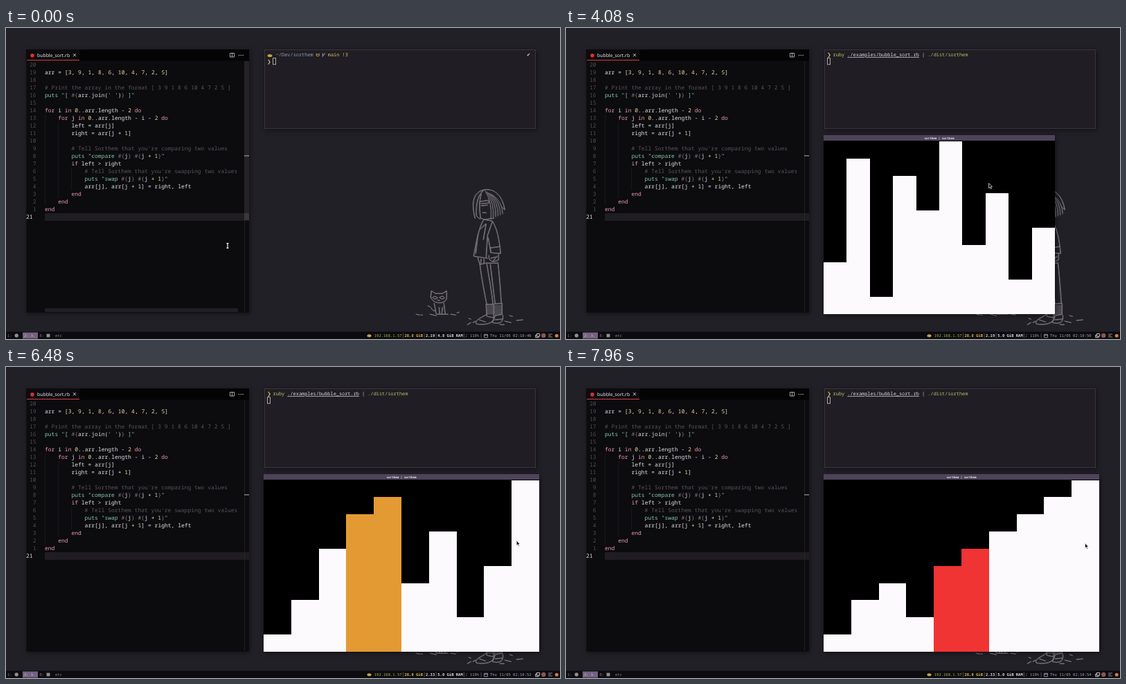
These frames come from a looping animation (800 px wide and 450 px high, 8000 ms). An HTML page:

```html
<!DOCTYPE html>
<html lang="en">
<head>
<meta charset="utf-8">
<title>Bubble sort on a desktop</title>
<style>
  html, body { margin: 0; width: 100%; height: 100%; overflow: hidden; background: #222027; }
  svg { display: block; width: 800px; height: 450px; }
  text { white-space: pre; text-rendering: geometricPrecision; font-family: "Noto Sans Mono", monospace; }
  .code { font-size: 8px; fill: #e2e0e4; }
  .term { font-size: 6.92px; fill: #d6d4d8; }
  .bar { font: 5.5px "DejaVu Sans Mono", monospace; }
  .bold { font-weight: bold; }
  .shadow { filter: drop-shadow(1.5px 2px 3px rgba(0, 0, 0, .5)); }
  .sketch { fill: none; stroke: #78767b; stroke-linecap: round; stroke-linejoin: round; }
</style>
</head>
<body>
<svg id="stage" viewBox="0 0 800 450"></svg>
<script>
const LOOP = 8000;
const stage = document.getElementById('stage');

function set(node, attrs) {
  for (const key in attrs) node.setAttribute(key, attrs[key]);
  return node;
}
function el(tag, attrs, parent = stage, text) {
  const node = set(document.createElementNS('http://www.w3.org/2000/svg', tag), attrs);
  if (text !== undefined) node.textContent = text;
  parent.appendChild(node);
  return node;
}
const box = (x, y, width, height, fill, parent, more) => el('rect', { x, y, width, height, fill, ...more }, parent);
const label = (x, y, cls, fill, text, parent) => el('text', { x, y, class: cls, fill, style: `fill:${fill}` }, parent, text);
const path = (d, stroke, width, parent) => el('path', { d, stroke, 'stroke-width': width, fill: 'none' }, parent);
const show = (node, on) => set(node, { opacity: +on });
const clamp = (v, lo, hi) => Math.min(hi, Math.max(lo, v));

// Wallpaper
box(0, 0, 800, 450, '#222027');
function drawSketch() {
  const g = el('g', { class: 'sketch', id: 'sketch' });
  const strokes = [
    // head
    'M677 275C671 252 675 237 690 234C706 231 717 244 720 263L715 258',
    'M690 234C681 241 678 254 679 272L684 276M686 240C683 250 683 262 685 275',
    'M684 251L697 249L697 253L686 254M686 257L695 256M688 267L693 267M685 275L691 277L704 275',
    // jacket and hand
    'M690 277C684 284 680 303 675 330L695 333M690 277L702 279C709 290 712 306 714 326L700 325L696 303',
    'M699 318L713 316M702 280L695 300L693 332M684 291L693 283L689 306M681 300L678 326M700 325L699 318',
    'M697 329C696 338 704 340 711 335L711 327M700 333L707 331M703 337L709 330',
    // legs
    'M681 332L684 342L692 340L709 340M686 334L685 341M690 334L690 340',
    'M684 342C687 365 691 385 694 400M694 341C697 360 701 380 703 400M699 341L706 399M710 339C713 365 714 385 715 399',
    // socks and shoes
    'M693 400L694 417L704 419L704 400ZM705 399L716 398L716 414L706 416',
    'M694 414C684 420 676 423 679 428C690 430 704 428 705 419M683 422L692 425M706 416L702 426C712 429 719 426 717 415M706 422L716 421',
    // cat
    'M613 389L614 380L620 384L630 384L636 380L636 391C634 400 616 400 613 389',
    'M616 390Q619 386 623 390Q619 394 616 390M626 390Q630 386 633 390Q630 394 626 390M623 394L626 394',
    'M618 398L621 414L634 414L632 398M625 404L626 414M630 404L629 414M620 409C612 410 617 403 609 402',
    // ground
    'M592 414l5 1M599 415l2 0M612 414l9 2M635 414l3 0M651 412l3 -1M642 414l7 1M666 429l5 -3M674 426l4 -2M720 424l9 2M737 423l9 -1M727 416l4 1M668 420l3 1M713 429l6 0'
  ];
  strokes.forEach(d => el('path', { d }, g));
  let hatch = '', hair = '';
  for (let x = 695; x < 716; x += 2) hatch += `M${x} 401l.6 13`;
  for (let i = 0; i < 6; i++) hair += `M${692 + i * 2} ${236 + i}Q${702 + i * 3} 252 ${700 + i * 3.4} ${276 - i * 1.5}`;
  el('path', { d: hatch, 'stroke-width': .6 }, g);
  el('path', { d: hair, 'stroke-width': .8 }, g);
  // A second, offset pass gives the doubled pencil line.
  el('use', { href: '#sketch', transform: 'translate(.7 .5)', opacity: .8 });
}
drawSketch();

// Editor
const CODE = `
arr = [3, 9, 1, 8, 6, 10, 4, 7, 2, 5]

# Print the array in the format [ 3 9 1 8 6 10 4 7 2 5 ]
puts "[ #{arr.join(' ')} ]"

for i in 0..arr.length - 2 do
    for j in 0..arr.length - i - 2 do
        left = arr[j]
        right = arr[j + 1]

        # Tell Sorthem that you're comparing two values
        puts "compare #{j} #{j + 1}"
        if left > right
            # Tell Sorthem that you're swapping two values
            puts "swap #{j} #{j + 1}"
            arr[j], arr[j + 1] = right, left
        end
    end
end
`.split('\n');

function highlight(line, node) {
  const add = (text, fill) => el('tspan', { style: `fill:${fill}` }, node, text);
  if (/^\s*#/.test(line)) return add(line, '#565459');
  let inString = false, inHole = false;
  for (const tok of line.match(/#\{|\}|"|'[^']*'|\w+|\s+|./g) || []) {
    let fill = '#e2e0e4';
    if (tok === '#{' || tok === '}') { inHole = tok === '#{'; fill = '#77757a'; }
    else if (tok === '"') { inString = !inString; fill = '#82c9aa'; }
    else if (tok[0] === "'" || tok === 'puts' || (inString && !inHole)) fill = '#82c9aa';
    else if (/^(for|in|do|end|if)$/.test(tok)) fill = '#e79bb2';
    else if (/^\d/.test(tok)) fill = '#ead69b';
    add(tok, fill);
  }
}

box(29.5, 31, 321.5, 380.5, '#0c0b0e', stage, { class: 'shadow' });
box(29.5, 31, 321.5, 16.5, '#040405');
box(30, 31, 76, 16.5, '#0c0b0e');
box(30, 46, 76, 1, '#cf4444');
el('circle', { cx: 38, cy: 39.7, r: 2.8, fill: '#d8302f' });
el('text', { x: 45, y: 42, style: 'font:6.85px "Noto Sans",sans-serif', fill: '#e6e4e8' }, stage, 'bubble_sort.rb');
path('M97 37.2l4 4m0 -4l-4 4', '#dcdade', .9);
path('M323.5 36.5h6v5.5h-6zM326.5 36.5v5.5', '#cfcdd1', .8);
[336.5, 339.3, 342.1].forEach(cx => el('circle', { cx, cy: 39.5, r: .7, fill: '#cfcdd1' }));
box(56, 268, 295, 11, '#1f1d21');
box(344, 48, .7, 363, '#2c2a2e');

let indent = 0;
CODE.forEach((line, i) => {
  const y = 56 + i * 11;
  const current = i === 20;
  if (line || current) indent = line.search(/\S|$/);
  for (let col = 0; col < indent; col += 4) box(56 + col * 4.8, y - 8, .6, 11, '#242227');
  el('text', { x: current ? 38.6 : 43.5, y, class: 'code', 'text-anchor': 'end', style: `fill:${current ? '#e6e4e8' : '#504e53'}` },
    stage, current ? 21 : 20 - i);
  highlight(line, el('text', { x: 56, y, class: 'code' }));
});
const scrollbars = el('g', {});
box(56, 405.5, 279, 5.5, '#212024', scrollbars);
box(344, 48, 7, 230, '#242227', scrollbars);
box(344, 268, 7, 10, '#39373b', scrollbars);
const marker = box(344, 184.3, 7, 1.2, '#9a989c');

// Terminal
const terminal = box(373.5, 31.5, 391, 114, '#201e24', stage, { class: 'shadow', 'stroke-width': 1 });
const GLYPH = 6.92 * .6;
const COMMAND = [['ruby', '#c0c968'], [' ', '#fff'], ['./examples/bubble_sort.rb', '#dcdade', 'underline'],
  [' | ', '#d6d4d8'], ['./dist/sorthem', '#b9c168']];
const COMMAND_LENGTH = COMMAND.reduce((sum, part) => sum + part[0].length, 0);

const prompt = el('g', {});
el('ellipse', { cx: 381, cy: 40, rx: 3.4, ry: 2.1, fill: '#c2a640' }, prompt);
label(389.8, 41.3, 'term', '#8c9fb8', '~/Dev/sorthem', prompt);
path('M448.2 37.2l.8 .9h2.4l.8 -.9v3q-2 1.2 -4 0z', '#c9b65a', .8, prompt);
path('M457.3 36.2v5.6M460.3 36.2v1.3q0 1.4 -3 2.3', '#d6d4d8', .7, prompt);
label(464.8, 41.3, 'term', '#d5c068', 'main !3', prompt);
label(751.8, 41.3, 'term', '#d6d4d8', '✔', prompt);

const arrows = [41.3, 51].map(y => label(377, y, 'term', '#cdbf5c', '❯'));
const commandLine = el('text', { x: 385.6, class: 'term' });
const commandParts = COMMAND.map(([text, fill, line]) =>
  el('tspan', { style: `fill:${fill};text-decoration:${line || 'none'}` }, commandLine, text));
const suggestion = el('tspan', { style: 'fill:#5f5d62' }, commandLine);
const caret = el('rect', { y: 43.6, height: 9.2, 'stroke-width': .8 });

// Status bar
box(0, 439.5, 800, 10.5, '#0c0b0f');
box(24, 440.5, 22, 9, '#75617f');
[[2, '#77757a', '1:'], [26, '#c9bfd0', '2: λ.'], [48.5, '#77757a', '8:'], [71, '#8a888d', 'etc']]
  .forEach(([x, fill, text]) => label(x, 447, 'bar', fill, text));
el('circle', { cx: 15.2, cy: 445, r: 2.7, fill: '#8f8d92' });
box(58.5, 442.6, 5, 4.8, '#8f8d92');
el('ellipse', { cx: 524.5, cy: 445.3, rx: 3, ry: 2, fill: '#c2a640' });
label(531.8, 447, 'bar', '#a5b04e', '192.168.1.57');
label(575.5, 447, 'bar bold', '#e0b650', '28.8 GiB');
const load = label(606, 447, 'bar bold', '#dcdade', '');
const memory = label(623.3, 447, 'bar bold', '#dcdade', '');
label(663.3, 447, 'bar', '#a09ea3', '♪ 110%');
const clock = label(699, 447, 'bar', '#a9a1b2', '');
[573.5, 604, 621, 661.3, 686].forEach(x => box(x - .3, 441.5, .7, 7, '#6b696e'));
path('M690.5 443.2h5v4.6h-5zM690.5 444.5h5', '#a9a1b2', .8);
path('M766.3 442.5h4.4v3.6h-4.4zM766 444.2h-1.3v3.6h4.4v-1.4', '#dedce0', .9);
el('circle', { cx: 776.3, cy: 445, r: 3.2, fill: '#8f5553' });
path('M783 443h6M783 445h4M783 447h6', '#918f94', .9);
el('circle', { cx: 795.2, cy: 445.2, r: 2.5, fill: '#d97a3a' });

// Sort window
const win = el('g', {});
const frame = box(0, 0, 0, 0, '#000', win, { class: 'shadow' });
const titleBar = box(0, 0, 0, 8, '#4d4459', win);
const title = el('text', { y: 5.5, 'text-anchor': 'middle', style: 'font:bold 4.2px "DejaVu Sans Mono",monospace', fill: '#efedf1' },
  win, 'sorthem | sorthem');
const START = [3, 9, 1, 8, 6, 10, 4, 7, 2, 5];
const bars = START.map(() => el('rect', { 'shape-rendering': 'crispEdges' }, win));

function sortSteps(values) {
  const arr = [...values], steps = [];
  for (let i = 0; i < arr.length - 1; i++) {
    for (let j = 0; j < arr.length - i - 1; j++) {
      steps.push({ arr: [...arr], j, fill: '#e39a33' });
      if (arr[j] > arr[j + 1]) {
        [arr[j], arr[j + 1]] = [arr[j + 1], arr[j]];
        steps.push({ arr: [...arr], j, fill: '#f03333' });
      }
    }
  }
  return steps;
}
const STEPS = sortSteps(START);
const IDLE = { arr: START, j: -9 };
const SORT_START = 5569, STEP_TIME = 42.5;

// Pointer
const pointers = {
  beam: el('g', {}), arrow: el('g', {}), move: el('g', {})
};
path('M-1.6 -3.4h3.2M0 -3.4v6.8M-1.6 3.4h3.2', '#f4f2f6', 1.2, pointers.beam);
el('path', { d: 'M0 0V7.2L1.7 5.6L2.9 8.2L4 7.7L2.9 5.1H5Z', fill: '#111', stroke: '#eee', 'stroke-width': .7 }, pointers.arrow);
el('path', { d: 'M0 -3.6L3.6 0L0 3.6L-3.6 0Z', fill: '#111', stroke: '#eee', 'stroke-width': .9 }, pointers.move);
el('circle', { r: 1, fill: '#eee' }, pointers.move);

const T = { focus: 640, type: 1120, accept: 1560, enter: 1760, open: 2240, grab: 2680, drop: 3720, resize: 4440, sized: 4920 };
const POINTER_PATH = [
  [280, 320, 315], [840, 473.5, 107], [2100, 473.5, 107], [2600, 464, 163], [T.grab, 464, 163], [3280, 558, 238],
  [3440, 578, 223], [T.drop, 603, 223], [4000, 603, 223], [4320, 650, 233], [T.resize, 650, 233], [T.sized, 714, 231],
  [5120, 714, 231], [6000, 727.5, 251], [6880, 744.5, 251.3], [LOOP, 749.5, 255]
];
function pointerAt(t) {
  const next = POINTER_PATH.findIndex(p => p[0] >= t);
  if (next < 1) return POINTER_PATH[0].slice(1);
  const [t0, x0, y0] = POINTER_PATH[next - 1], [t1, x1, y1] = POINTER_PATH[next];
  const u = (t - t0) / (t1 - t0), k = u * u * (3 - 2 * u);
  return [x0 + (x1 - x0) * k, y0 + (y1 - y0) * k];
}

function renderTerminal(t) {
  const focused = t >= T.focus && t < T.open;
  const entered = t >= T.enter;
  const typed = t < T.type ? 0 : t >= T.accept ? COMMAND_LENGTH : Math.min(4, 1 + Math.floor((t - T.type) / 80));
  set(terminal, { stroke: focused ? '#4e4c52' : '#38363c' });
  set(marker, { fill: focused ? '#a06a6c' : '#9a989c' });
  show(prompt, !entered);
  show(arrows[0], entered);
  show(arrows[1], !entered);
  set(commandLine, { y: entered ? 41.3 : 51 });
  let left = typed, rest = '';
  COMMAND.forEach(([text], i) => {
    const count = clamp(left, 0, text.length);
    commandParts[i].textContent = text.slice(0, count);
    rest += text.slice(count);
    left -= count;
  });
  suggestion.textContent = typed ? rest : '';
  const x = entered ? 377.4 : 385.6 + typed * GLYPH;
  set(caret, focused ? { x, width: 1, fill: '#eceaee', stroke: 'none' } : { x, width: 4, fill: 'none', stroke: '#c9c7cb' });
}

function renderWindow(t) {
  set(win, { opacity: clamp((t - T.open) / 160, 0, 1) });
  const [px, py] = pointerAt(clamp(t, T.grab, T.drop));
  const [rx, ry] = pointerAt(clamp(t, T.resize, T.sized));
  const width = 334 + rx - 650, height = 259 + ry - 233;
  set(win, { transform: `translate(${px - 231} ${py - 68})` });
  set(frame, { width, height });
  set(titleBar, { width });
  set(title, { x: width / 2 });
  const index = Math.floor((t - SORT_START) / STEP_TIME);
  const { arr, j, fill } = index < 0 ? IDLE : STEPS[Math.min(index, STEPS.length - 1)];
  const w = width / arr.length, unit = (height - 8.5) / 10;
  bars.forEach((bar, i) => set(bar, {
    x: i * w, y: height - arr[i] * unit, width: w, height: arr[i] * unit,
    fill: i === j || i === j + 1 ? fill : '#fdfafd'
  }));
}

function renderPointer(t) {
  const [x, y] = pointerAt(t);
  const overText = t < T.open && (x < 351 || (x > 374 && y > 32 && y < 145));
  const kind = t >= T.grab && t < T.drop ? 'move' : overText ? 'beam' : 'arrow';
  for (const name in pointers) show(pointers[name], name === kind);
  set(pointers[kind], { transform: `translate(${x} ${y})` });
}

function render(t) {
  renderTerminal(t);
  renderWindow(t);
  renderPointer(t);
  set(scrollbars, { opacity: clamp(1 - (t - T.focus) / 400, 0, 1) });
  clock.textContent = `Thu 11/05 02:10:${46 + Math.floor((t + 180) / 1000)}`;
  load.textContent = t < 4820 ? '2.19' : '2.33';
  memory.textContent = `${t < 1820 ? '4.8' : '5.0'} GiB RAM`;
}

function tick() {
  render(performance.now() % LOOP);
  requestAnimationFrame(tick);
}
tick();
</script>
</body>
</html>
```
